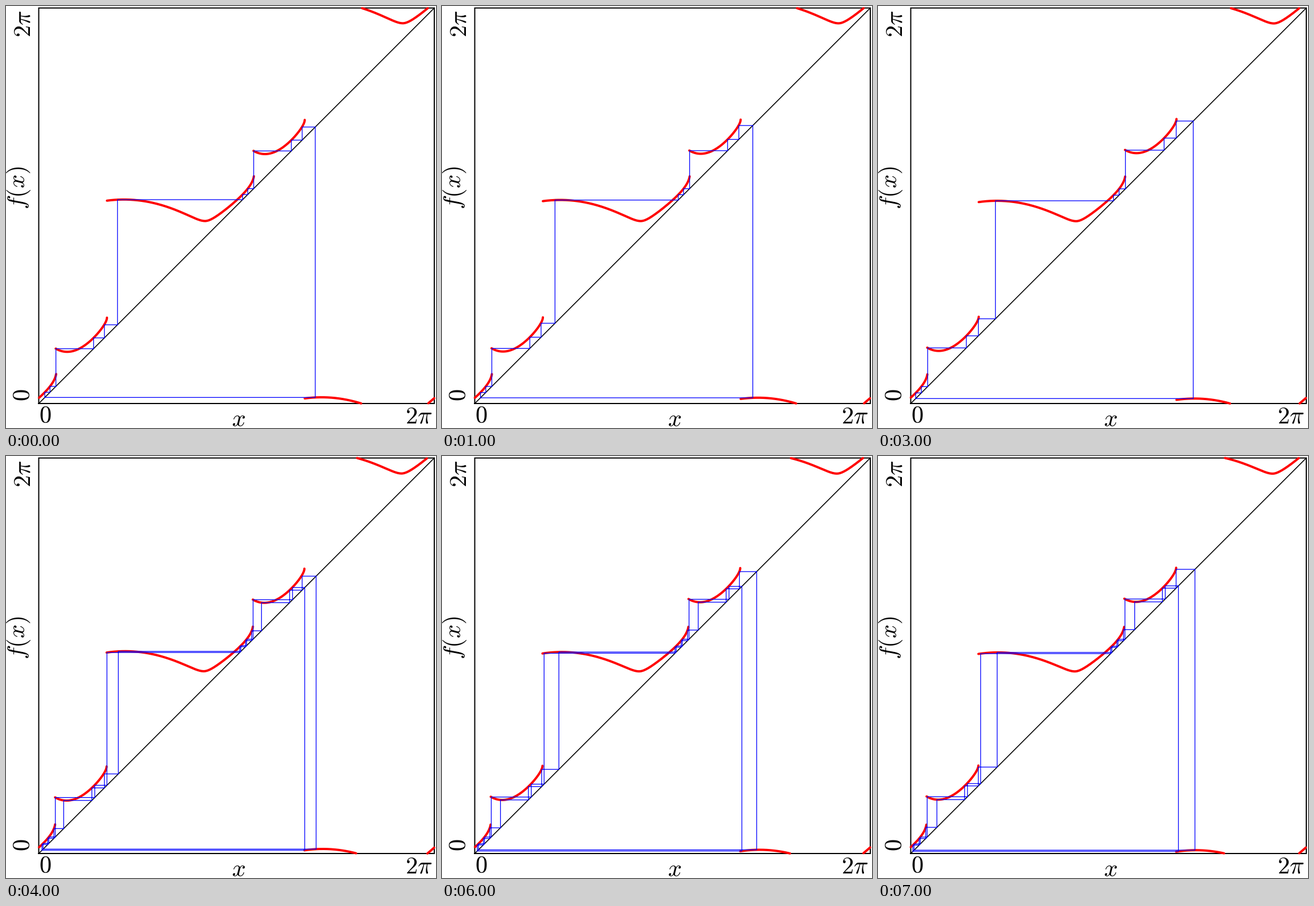
A matplotlib script for the animation above (8 s loop, 755x741 px).

```python
import numpy as np
import matplotlib.pyplot as plt
from matplotlib.animation import FuncAnimation

WIDTH, HEIGHT, DPI = 755, 741, 64
PX = 72 / DPI                      # one pixel in points
X0, Y0, SIDE = 57.25, 3.25, 694.5  # plot box
X1, Y1 = X0 + SIDE, Y0 + SIDE
DIAG = X0 + Y1                     # x + y on the diagonal
HALF = SIDE / 2                    # pi, the symmetry shift of the map
FRAMES, INTERVAL = 8, 1000
GAP = (np.nan, np.nan)


def short_branch(x, a):
    """Rising arc that ends in a square-root tip."""
    u = np.clip((x - 87 + 2 * a) / (90 + a), 0, 1)
    rise = 5.7 - 72.2 * u + 125.1 * u**2 - 37.2 * u**3 + 38.6 * (1 - np.sqrt(1 - u))
    return 607 - 3.8 * a - rise


def long_branch(x, a):
    """Hump, rounded valley and steep square-root tip."""
    v = x - (349.5 - 3.9 * a)
    t = np.clip(v / (85.8 + 0.8 * a), 0, 1)
    bend = (0.655 - 0.035 * a) * (np.hypot(v, 15) - 15)
    tip = (52 + 2 * a) * (1 - np.sqrt(1 - t**1.5))
    return 377.3 + 0.7 * a - (bend - 0.00228 * v**2 + tip)


def map_curve(a):
    """Both branches, repeated every half turn and wrapped into the box."""
    left, mid, right = 87 - 2 * a, 177 - a, 435 - 3.1 * a
    ease = np.sin(np.linspace(0, np.pi / 2, 240))   # denser at the steep tips
    pieces = []
    for branch, start, stop in ((short_branch, left, mid), (long_branch, mid, right)):
        xs = start + (stop - start) * ease
        base = np.column_stack([xs, branch(xs, a)])
        for k in (-1, 0, 1):
            for wrap in (0, SIDE):
                p = base + (k * HALF, wrap - k * HALF)
                x, y = p.T
                p[(x < X0) | (x > X1) | (y < Y0) | (y > Y1)] = np.nan
                pieces += [p, [GAP]]
    return np.vstack(pieces)


def iterate(x, a, long_steps, short_steps):
    """Orbit points from x on the long branch, then on the short one."""
    points = []
    for i in range(long_steps + short_steps):
        points.append(x)
        if i < long_steps:
            x = DIAG - long_branch(x, a)
        else:
            x = DIAG - (short_branch(x - HALF, a) - HALF)
    return points


def orbit(n):
    a = n / (FRAMES - 1)
    if n < 4:
        return iterate(195.5 + 10.5 * (n / 3) ** 1.25, a, 3, 3)
    # period doubled: two passes that feed each other
    return iterate(201 + 4 * (n - 5), a, 3, 2) + iterate(178 + (n - 5), a, 4, 3)


def wrapped(v):
    return X0 + (v - X0) % SIDE


def cobweb(xs):
    path = []
    for x, y in zip(xs, np.roll(xs, -1)):
        if y < x:
            y += HALF
        for shift in (0, HALF):
            u, v = wrapped(x + shift), wrapped(y + shift)
            path += [(u, DIAG - u), (u, DIAG - v), (v, DIAG - v), GAP]
    return np.array(path)


plt.rcParams["mathtext.fontset"] = "cm"
plt.rcParams["path.snap"] = False
fig = plt.figure(figsize=(WIDTH / DPI, HEIGHT / DPI), dpi=DPI, facecolor="white")
ax = fig.add_axes([0, 0, 1, 1])
ax.set_xlim(-0.25, WIDTH - 0.25)
ax.set_ylim(HEIGHT - 0.25, -0.25)
ax.axis("off")

ax.plot([X0, X1], [Y1, Y0], color="black", lw=1.6 * PX, zorder=1)
ax.plot([X0, X1, X1, X0, X0], [Y1, Y1, Y0, Y0, Y1], color="black", lw=2 * PX,
        solid_joinstyle="miter", solid_capstyle="projecting", zorder=1)
red, = ax.plot([], [], color="#ff0000", lw=4 * PX, solid_capstyle="round", zorder=2)
blue, = ax.plot([], [], color="#0000ff", lw=1.3 * PX, solid_joinstyle="miter", zorder=3)


def label(x, y, text, rotation=0):
    ax.text(x, y, text, fontsize=42.5 * PX, ha="center", va="baseline",
            rotation=rotation, rotation_mode="anchor", color="black")


label(68, 732, "$0$")
label(724, 732, r"$2\pi$")
label(407.5, 737.5, "$x$")
label(41.8, 683, "$0$", 90)
label(41.8, 31, r"$2\pi$", 90)
label(32.5, 319, "$f(x)$", 90)


def draw(n):
    red.set_data(*map_curve(n / (FRAMES - 1)).T)
    blue.set_data(*cobweb(orbit(n)).T)
    return red, blue


anim = FuncAnimation(fig, draw, frames=FRAMES, interval=INTERVAL, repeat=True, repeat_delay=0)
plt.show()
```
